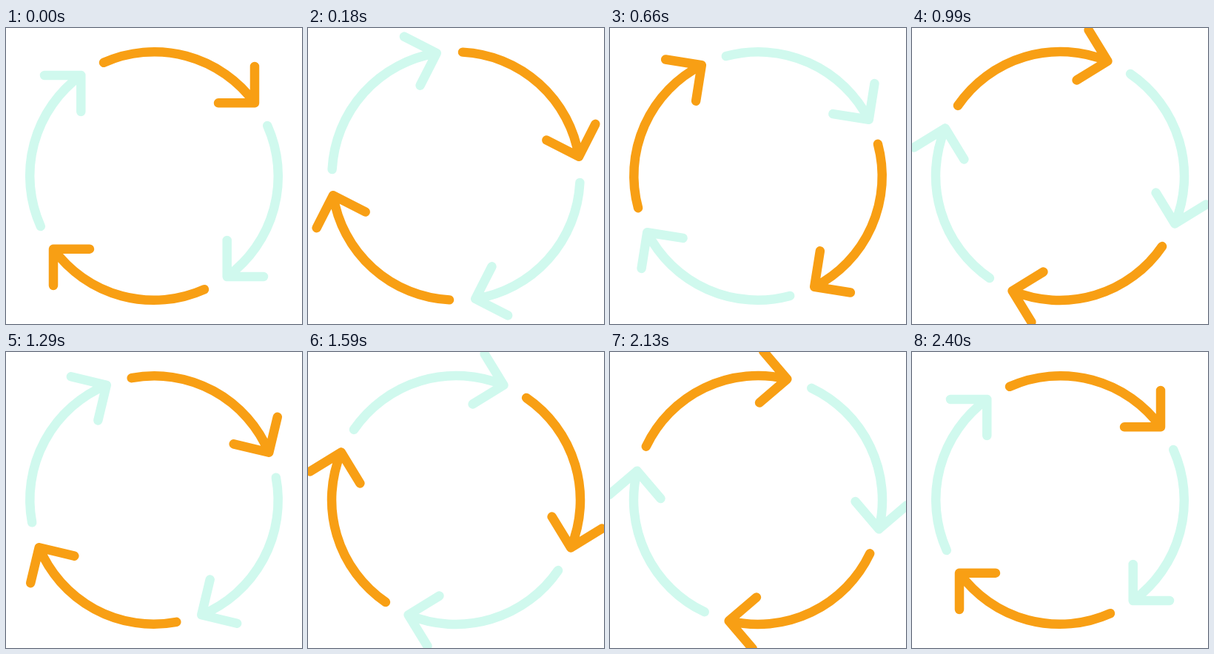
Animation of 400x400 px, one loop 2430 ms. Source, as an HTML page:

```html
<!DOCTYPE html>
<html lang="en">
<head>
<meta charset="utf-8">
<title>Rotating arrows</title>
<style>
  html, body { margin: 0; width: 100%; height: 100%; overflow: hidden; background: #fff; }
  svg { display: block; width: 100%; height: 100%; }
</style>
</head>
<body>
<svg viewBox="0 0 400 400">
  <defs>
    <path id="arrow" d="M132 46.8A167.6 167.6 0 0 1 336 101.3M336 52V101.3H287"/>
  </defs>
  <g id="ring" fill="none" stroke-width="12.5" stroke-linecap="round" stroke-linejoin="round">
    <g stroke="#f89f14">
      <use href="#arrow"/>
      <use href="#arrow" transform="rotate(180 200 200)"/>
    </g>
    <g stroke="#d0f9ee">
      <use href="#arrow" transform="rotate(90 200 200)"/>
      <use href="#arrow" transform="rotate(270 200 200)"/>
    </g>
  </g>
</svg>
<script>
  const LOOP = 2430, STEP = 30, DEGREES_PER_STEP = 4.5;
  const ring = document.getElementById('ring');

  function draw() {
    const step = Math.floor((performance.now() % LOOP) / STEP);
    ring.setAttribute('transform', `rotate(${step * DEGREES_PER_STEP} 200 200)`);
    requestAnimationFrame(draw);
  }
  draw();
</script>
</body>
</html>
```
